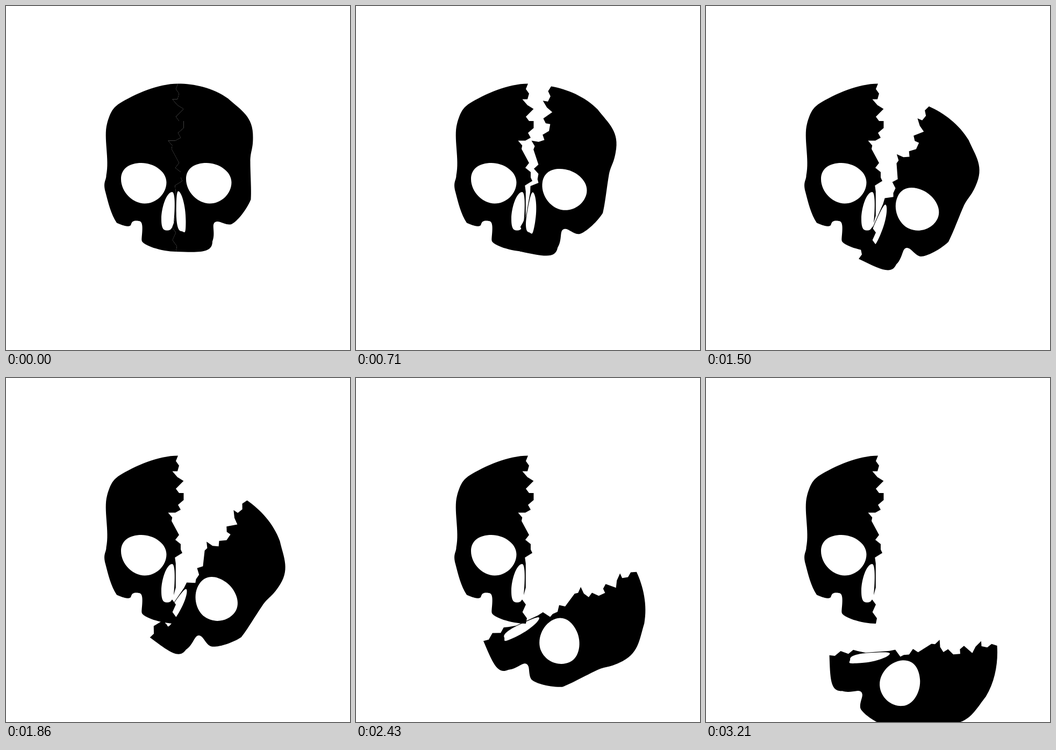
An HTML page with a canvas for the animation above (3570 ms loop, 640 by 640 pixels).

```html
<!DOCTYPE html>
<html lang="en">
<head>
<meta charset="utf-8">
<title>Splitting skull</title>
<style>
  html, body { margin: 0; width: 100%; height: 100%; overflow: hidden; background: #fff; }
  canvas { display: block; width: 640px; height: 640px; }
</style>
</head>
<body>
<canvas id="stage" width="640" height="640"></canvas>
<script>
const ctx = document.getElementById('stage').getContext('2d');

const LOOP = 3570;
const LAST = 45;

// Jagged edge shared by both halves, top to bottom
const crack = `M320 144.5 L316 154.5 322 163 319 173.5 309.5 173.5 319 184.5 330.4 191.5
  316 206 322 214 330.5 214 330.5 227 320 236 325 245 315 250.4 301.5 250.4 309.3 259.5
  308 266 322 292 315 301 325 309 325 319 328 325.5 314.3 334 315.8 345
  315.8 390 312 404 309 412 316 421.5 309.7 435.5 318 447 316 457`;

// Outer contours, from the chin up to the crown
const leftSide = `C290 457 253 445 252.5 436 S258 400 247 400 C229 397 236 409 229 409.5
  C222 411 213 406 206 403.5 C195 387 190 365 185 346 S186.5 325 186.5 315
  C193 285 181 245 188 219 S202 188 210 182 C240 163.5 283 144.5 320 144.5 Z`;

const rightSide = `C360 458.5 384 460 384 438 C388 428 386 418 385.8 411
  S388 401.5 393 401 S408 407 417 406.5 S447 381 455.5 360
  C457 345 454.5 310 454.5 290 S459.5 268 459.5 245
  C460.5 205 437 194 413 172 C385 152 350 144.5 320 144.5 Z`;

const leftNostril = `M309 346 C298 347 289 376 289 396 S294 417.5 300 417.5
  S307 415 309 412 L312 404 C314 385 316 346 309 346 Z`;

const rightNostril = `M320.5 344.5 C326 345 334.5 370 334.5 400 S332 419 326 419
  S316.8 405 316.8 385 S317 345 320.5 344.5 Z`;

function eye(x) {
  return `M${x} 322 c0 -20 16 -30 38 -30 s46.5 15 46.5 36 s-18.5 39.5 -40.5 39.5
    s-44 -21.5 -44 -45.5 Z`;
}

const left = new Path2D(crack + leftSide + eye(214) + leftNostril);
const right = new Path2D(crack + rightSide + eye(335) + rightNostril);

// Key poses of the falling half, placed by the middle of its eye
const poses = [
  { k: 0, turn: 0, x: 377, y: 330 },
  { k: 10, turn: 10, x: 387, y: 342 },
  { k: 21, turn: 24, x: 391.5, y: 379.3 },
  { k: 30, turn: 46.2, x: 387.5, y: 447.8 },
  { k: 34, turn: 65, x: 377.9, y: 490.9 },
  { k: 41, turn: 82.5, x: 364, y: 550.1 },
  { k: LAST, turn: 86, x: 360.5, y: 567.8 }
];

function slope(i, name) {
  const a = poses[i], b = poses[i + 1];
  return (b[name] - a[name]) / (b.k - a.k);
}

// Harmonic mean keeps the curve free of overshoot
function tangent(i, name) {
  const p = slope(Math.max(i - 1, 0), name);
  const q = slope(Math.min(i, poses.length - 2), name);
  return p * q <= 0 ? 0 : 2 * p * q / (p + q);
}

function ease(k, name) {
  const i = Math.max(0, poses.findIndex(p => p.k >= k) - 1);
  const a = poses[i], b = poses[i + 1];
  const h = b.k - a.k, s = (k - a.k) / h, r = 1 - s;
  return a[name] * r * r * (1 + 2 * s) + b[name] * s * s * (1 + 2 * r) +
    h * s * r * (r * tangent(i, name) - s * tangent(i + 1, name));
}

// 14 steps per second, with change times rounded to 10 ms
function stepAt(t) {
  return Math.min(LAST, Math.ceil((Math.floor(t / 10) + 0.5) * 0.14) - 1);
}

function draw(t) {
  const k = stepAt(t);
  ctx.resetTransform();
  ctx.fillStyle = '#fff';
  ctx.fillRect(0, 0, 640, 640);
  ctx.fillStyle = '#000';
  ctx.fill(left, 'evenodd');
  ctx.translate(ease(k, 'x'), ease(k, 'y'));
  ctx.rotate(ease(k, 'turn') * Math.PI / 180);
  ctx.translate(-poses[0].x, -poses[0].y);
  ctx.fill(right, 'evenodd');
}

const start = performance.now();
function tick() {
  draw((performance.now() - start) % LOOP);
  requestAnimationFrame(tick);
}
tick();
</script>
</body>
</html>
```
